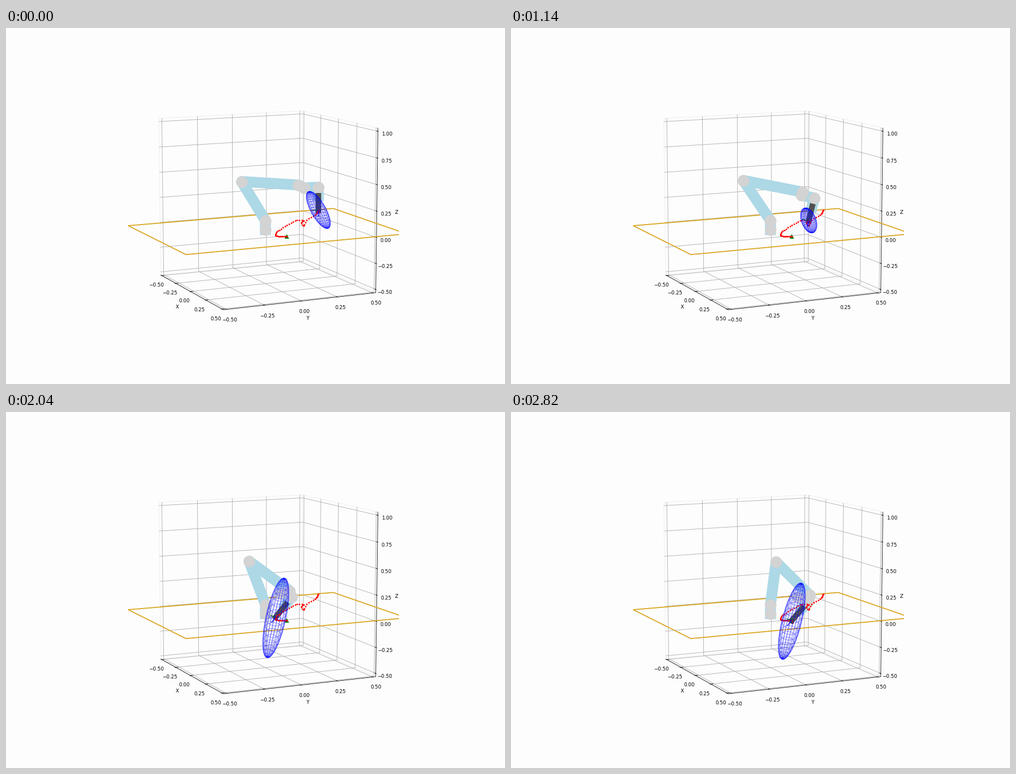
A matplotlib script for the animation above (2880 ms loop, 885 by 632 pixels).

```python
import numpy as np
import matplotlib.pyplot as plt
from matplotlib.animation import FuncAnimation
from matplotlib.collections import LineCollection
from matplotlib.patches import Rectangle

W, H, DPI = 885, 632, 100
FRAMES, STEP = 48, 60
PX = 72 / DPI  # points per pixel

# camera
ELEV, AZIM = np.radians(10), np.radians(-25)
CENTER = np.array([460.14, 312.6])
FOCAL, DIST, BOX = 2630.5, 10, 1.05625

# arm: shoulder height, upper arm, forearm, wrist offset
SHOULDER, UPPER, FORE, OFFSET = 0.089, 0.425, 0.392, 0.109


def project(x, y, z):
    """Perspective view of a data point, in stage pixels."""
    p = BOX * np.array([x, y, (z - 0.25) / 1.5])
    ce, se, ca, sa = np.cos(ELEV), np.sin(ELEV), np.cos(AZIM), np.sin(AZIM)
    right = p @ [-sa, ca, 0]
    up = p @ [-se * ca, -se * sa, ce]
    depth = DIST - p @ [ce * ca, ce * sa, se]
    return CENTER + FOCAL * np.array([right, -up]) / depth


def path3d(*points):
    return np.array([project(*p) for p in points])


def smooth(*keys):
    """Cubic Hermite curve through (frame, values...) keys."""
    k = np.array(keys, float)
    t, v = k[:, 0], k[:, 1:]
    m = np.gradient(v, t, axis=0)
    n = np.arange(FRAMES)
    i = np.clip(np.searchsorted(t, n, side="right") - 1, 0, len(t) - 2)
    h = (t[i + 1] - t[i])[:, None]
    s = (n - t[i])[:, None] / h
    out = ((1 + 2 * s) * (1 - s) ** 2 * v[i] + s * (1 - s) ** 2 * h * m[i]
           + s * s * (3 - 2 * s) * v[i + 1] + s * s * (s - 1) * h * m[i + 1])
    return out.squeeze()


# --- motion -------------------------------------------------------------
frame = np.arange(FRAMES)
tip = smooth((0, 554, 323), (8, 545, 334), (11, 533, 341), (14, 528, 351),
             (17, 524, 344.5), (19, 528, 342), (21, 520, 340.5),
             (26, 502, 347.5), (30, 488, 356.5), (34, 478.5, 364),
             (37, 478, 368), (40, 483, 369.5), (47, 498, 370))
yaw = np.radians(54 - 36 * np.tanh((frame - 22.5) / 17))
lean = smooth((0, 0), (26, 16), (38, 32), (47, 30))
size = smooth((0, 33), (25, 33), (34, 71), (36.5, 98), (39, 86), (47, 68))
slant = smooth((0, -0.47), (19, -0.24), (26, -0.09), (38, 0.3), (47, 0.235))


def arm_pose(n):
    """Elbow and three wrist joints in pixels, solved back from the tip."""
    w3 = tip[n] + [lean[n], -40.5 + 7 * (lean[n] / 32) ** 3]
    w2 = w3 + [-25 + 6 * lean[n] / 32, 1.5 - 7.5 * (1 - np.exp(-n / 10))]

    c, s = np.cos(yaw[n]), np.sin(yaw[n])
    root = project(0, 0, SHOULDER)
    out, side, up = [(project(*(0.2 * np.array(d)) + [0, 0, SHOULDER]) - root) / 0.2
                     if False else
                     (project(0.2 * d[0], 0.2 * d[1], SHOULDER + 0.2 * d[2]) - root) / 0.2
                     for d in ((c, s, 0), (s, -c, 0), (0, 0, 1))]
    w1 = w2 - OFFSET * side

    r, z = np.linalg.solve(np.column_stack([out, up]), w1 - root)
    reach = np.hypot(r, z)
    bend = (UPPER ** 2 + reach ** 2 - FORE ** 2) / (2 * UPPER * reach)
    angle = np.arctan2(z, r) + np.arccos(np.clip(bend, -1, 1))
    r, z = UPPER * np.cos(angle), UPPER * np.sin(angle)
    return project(r * c, r * s, SHOULDER + z), w1, w2, w3


# --- stage --------------------------------------------------------------
fig = plt.figure(figsize=(W / DPI, H / DPI), dpi=DPI, facecolor="#fdfdfd")
ax = fig.add_axes([0, 0, 1, 1])
ax.set_xlim(0, W)
ax.set_ylim(H, 0)
ax.axis("off")


def lines(paths, color, width, z, **kw):
    return ax.add_collection(
        LineCollection(paths, colors=color, linewidths=width * PX, zorder=z, **kw))


def label(point, text, va="top"):
    ax.text(*project(*point), text, fontsize=8.78 * PX, family="DejaVu Sans",
            color="black", ha="center", va=va)


E = 0.5 + 1 / 48
LO, HI = -0.5 - 1.5 / 48, 1 + 1.5 / 48
ticks = np.linspace(-0.5, 0.5, 5)
heights = np.linspace(-0.5, 1, 7)

lines([path3d((-E, -E, LO), (-E, -E, HI), (-E, E, HI), (E, E, HI)),
       path3d((-E, E, HI), (-E, E, LO), (E, E, LO)),
       path3d((-E, E, LO), (-E, -E, LO))], "#ececec", 0.8, 1)
grid = [path3d((v, E, HI), (v, E, LO), (v, -E, LO)) for v in ticks]
grid += [path3d((-E, v, HI), (-E, v, LO), (E, v, LO)) for v in ticks]
grid += [path3d((-E, -E, v), (-E, E, v), (E, E, v)) for v in heights]
lines(grid, "#b0b0b0", 0.9, 2)
lines([path3d((-E, -E, LO), (E, -E, LO)), path3d((E, -E, LO), (E, E, LO)),
       path3d((E, E, LO), (E, E, HI))], "black", 0.8, 3)
IN, OUT = E - 0.2 / 12, E + 0.1 / 12
marks = [path3d((v, -IN, LO), (v, -OUT, LO)) for v in ticks]
marks += [path3d((IN, v, LO), (OUT, v, LO)) for v in ticks]
marks += [path3d((IN, E, v), (OUT, E, v)) for v in heights]
lines(marks, "black", 0.8, 3)

PAD, FAR = 0.0415, 0.0902  # tick label and axis label distance
for v in heights:
    text = f"{v:.2f}".replace("-", "\u2212")
    label((E + PAD, E + PAD, v), text)
    if v <= 0.5:
        label((v, -E - PAD, LO - 1.5 * PAD), text)
        label((E + PAD, v, LO - 1.5 * PAD), text)
label((0, -E - FAR, LO - 1.5 * FAR), "X", "center")
label((E + FAR, 0, LO - 1.5 * FAR), "Y", "center")
label((E + FAR, E + FAR, 0.25), "Z", "center")

table = lines([path3d((-0.5, -0.75, 0), (0.5, -0.75, 0), (0.5, 0.75, 0),
                      (-0.5, 0.75, 0), (-0.5, -0.75, 0))], "goldenrod", 1.76, 4)
table.set_clip_path(Rectangle((210.2, 75.8), 486.6, 486.6, transform=ax.transData))

# --- moving parts -------------------------------------------------------
base = path3d((0, 0, 0), (0, 0, SHOULDER))
arm, = ax.plot([], [], color="lightblue", lw=19.3 * PX, zorder=5,
               solid_capstyle="projecting", solid_joinstyle="round")
joints, = ax.plot([], [], "o", color="lightgray", ms=20.6 * PX, mew=0, zorder=6)
tool, = ax.plot([], [], color="#505050", lw=10 * PX, zorder=7,
                solid_capstyle="projecting")
ax.plot(*tip[-1], "^", color="green", ms=7.5 * PX, mew=0, zorder=8)
ax.plot(*tip.T, "o", color="red", ms=2.8 * PX, mew=0, zorder=9)
triad = lines([], ["red", "green", "blue"], 1.3, 10)
mesh = lines([], "blue", 1.0, 11, alpha=0.38)

U, V = np.meshgrid(np.linspace(0, 2 * np.pi, 21), np.linspace(0, np.pi, 21))


def ellipsoid(center, half, slope):
    """Wire rings and meridians of an ellipsoid leaning by slope."""
    tilt = 0.2 * half
    pole = np.sqrt(half ** 2 - tilt ** 2)
    girth = 14.5 + 0.09 * (half - 33)
    x = girth * np.cos(U) * np.sin(V) + slope * half ** 2 / pole * np.cos(V)
    y = tilt * np.sin(U) * np.sin(V) + pole * np.cos(V)
    pts = np.stack([center[0] + x, center[1] - y], axis=-1)
    return list(pts[1:-1]) + list(pts[:, :-1].swapaxes(0, 1))


def update(n):
    end = tip[n]
    elbow, w1, w2, w3 = arm_pose(n)
    flange = w3 + 0.375 * (end - w3)
    chain = np.vstack([base, elbow, w1, w2, w3, flange])
    arm.set_data(*chain.T)
    joints.set_data(*chain[:-1].T)
    tool.set_data(*np.array([flange, end]).T)
    axes = (3, 6), 0.5 * (w2 - w3), 0.28 * (end - w3)
    triad.set_segments([[end, end + d] for d in axes])
    center = end + [0, 0.04 * (size[n] - 33)]
    mesh.set_segments(ellipsoid(center, size[n], slant[n]))
    return arm, joints, tool, triad, mesh


anim = FuncAnimation(fig, update, frames=FRAMES, interval=STEP,
                     repeat=True, repeat_delay=0, blit=False)
plt.show()
```
